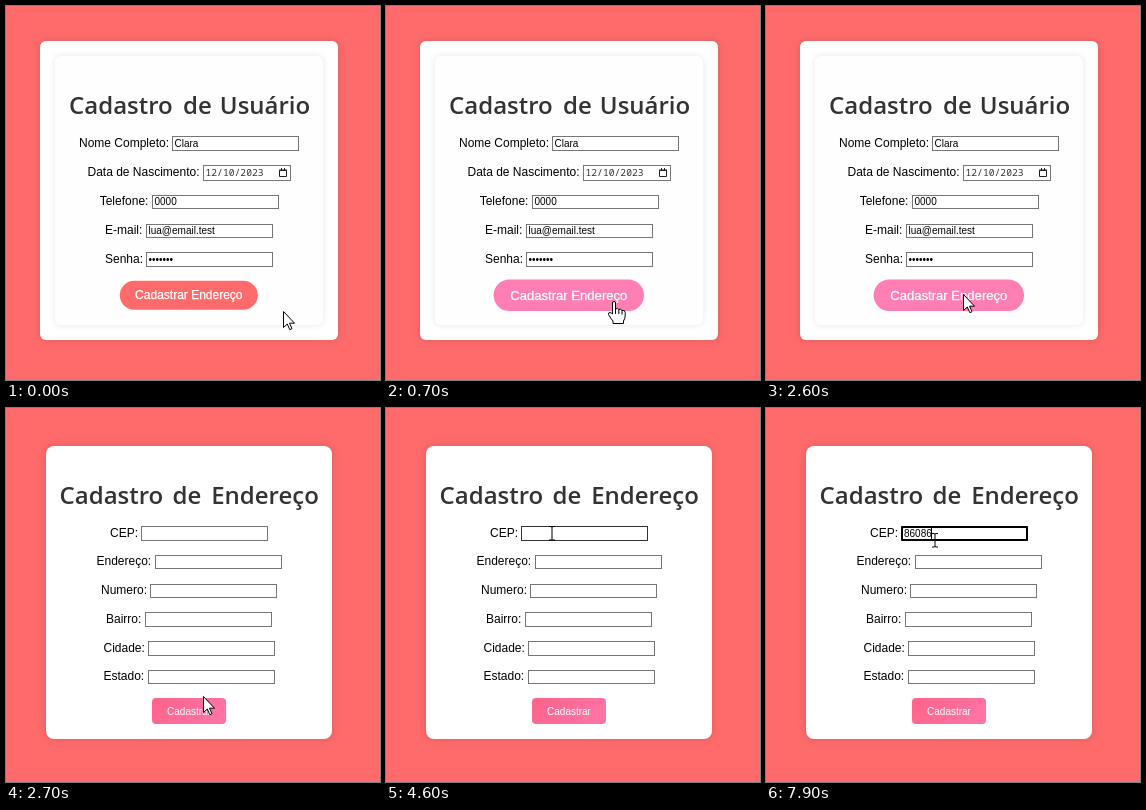
These frames come from a looping animation (374 by 374 pixels, 8000 ms). An HTML page:

```html
<!DOCTYPE html>
<html lang="pt-BR">
<head>
<meta charset="utf-8">
<style>
  html, body { margin: 0; height: 100%; overflow: hidden; background: #ff6b6b; }
  svg { display: block; width: 374px; height: 374px; font: 12px Arial, "Liberation Sans", sans-serif; }
  .card { fill: #fff; filter: drop-shadow(0 0 4px rgba(0, 0, 0, .14)); }
  .form { fill: #fefefe; filter: drop-shadow(0 0 3px rgba(0, 0, 0, .1)); }
  .title { font: 600 24px "Comic Sans MS", "Open Sans", "Noto Sans", cursive; fill: #333; text-anchor: middle; }
  .box { fill: #fff; stroke: #767676; }
  .value { font-size: 10px; }
  .date { font: 9.7px "Noto Sans Mono", monospace; fill: #333; }
  .button { fill: #fff; stroke: #fff; stroke-width: .25px; text-anchor: middle; }
  .button.value { stroke: none; }
  .cursor { fill: #fff; stroke: #000; stroke-linejoin: round; }
</style>
</head>
<body>
<svg viewBox="0 0 374 374">
  <defs>
    <linearGradient id="pink" x2="1" y2=".4">
      <stop stop-color="#ff6389"/><stop offset="1" stop-color="#ff73a4"/>
    </linearGradient>
  </defs>
  <rect width="374" height="374" fill="#ff6b6b"/>

  <g id="userPage">
    <rect class="card" x="34" y="35" width="298" height="299" rx="6"/>
    <rect class="form" x="49" y="50" width="268" height="269" rx="6"/>
    <text class="title" y="108"><tspan x="118">Cadastro</tspan> <tspan x="194.5">de</tspan> <tspan x="259">Usuário</tspan></text>
    <g id="userRows"></g>
    <path d="M273.500 164.500h7v6h-7zM273 164h8M275.500 162v2M278.500 162v2" fill="none" stroke="#222"/>
    <g id="submit">
      <rect id="pill" x="-69" y="-14.500" width="138" height="29" rx="14.500"/>
      <text class="button" y="4">Cadastrar Endereço</text>
    </g>
  </g>

  <g id="addressPage">
    <rect class="card" x="40" y="38" width="286" height="293" rx="8"/>
    <text class="title" y="96"><tspan x="108.5">Cadastro</tspan> <tspan x="184">de</tspan> <tspan x="259">Endereço</tspan></text>
    <g id="addressRows"></g>
    <rect id="ring" x="136" y="119" width="125" height="13" rx="1.500" fill="#fff" stroke="#000" stroke-width="2"/>
    <text id="cep" class="value" x="138" y="129"></text>
    <path id="caret" d="M.5 120v11" stroke="#000"/>
    <rect x="146" y="290" width="74" height="26" rx="4" fill="url(#pink)"/>
    <text class="button value" x="183" y="307">Cadastrar</text>
  </g>

  <g id="cursor">
    <path id="arrow" class="cursor" d="M.5 .5V16.500L4.300 13 6.800 18.700 9 17.700 6.500 12.200H11.500Z"/>
    <path id="hand" class="cursor" d="M-1.500 13V2Q-1.500 .5 0 .5T1.500 2V8Q4 6.500 4.800 8.500 7 7.500 8 9.500 11 8.500 11.200 11.500V15Q11 18 9.500 20V22.500H-1V20Q-3 18-5.500 13.500-6 11.500-4 11.500-2.500 12-1.500 13ZM1.500 8v5M4.800 8.500v4.500M8 9.500v4"/>
    <path id="beam" d="M-3 -6.500H-1Q0 -6.500 0 -5.500 0 -6.500 1 -6.500H3M0 -5.500V6M-3 7H-1Q0 7 0 6 0 7 1 7H3" fill="none" stroke="#000"/>
  </g>
</svg>
<script>
const $ = id => document.getElementById(id);
const show = (id, on) => $(id).style.display = on ? '' : 'none';

// Field edges and baselines snap to whole pixels, as in a zoomed page.
function row({ label, lx, bx, y, value = '', width = 127, height = 14.4, kind = '' }) {
  const top = Math.round(y), bottom = Math.round(y + height), base = Math.round(y + 10.6);
  return `
    <text x="${lx}" y="${base}">${label}</text>
    <rect class="box" x="${bx + .5}" y="${top + .5}" width="${width - 1}" height="${bottom - top - 1}"/>
    <text class="value ${kind}" x="${bx + 2.5}" y="${base}">${value}</text>`;
}

$('userRows').innerHTML = [
  { label: 'Nome Completo:', lx: 73, bx: 166, y: 130.2, value: 'Clara' },
  { label: 'Data de Nascimento:', lx: 81.5, bx: 197, y: 159.2, value: '12/10/2023', width: 88, height: 15.6, kind: 'date' },
  { label: 'Telefone:', lx: 93.7, bx: 146, y: 188.8, value: '0000' },
  { label: 'E-mail:', lx: 99, bx: 140, y: 217.6, value: 'lua@email.test' },
  { label: 'Senha:', lx: 99, bx: 140, y: 246.4, value: '•'.repeat(7) },
].map(row).join('');

$('addressRows').innerHTML = [
  ['CEP:', 104, 135], ['Endereço:', 90.5, 149], ['Numero:', 95, 144],
  ['Bairro:', 100, 139], ['Cidade:', 97.5, 142], ['Estado:', 97.5, 142],
].map(([label, lx, bx], i) => row({ label, lx, bx, y: 118.1 + 28.75 * i })).join('');
const cepBox = $('addressRows').querySelector('rect');

// [time, x, y] of the pointer's hot spot
const path = [
  [0, 277, 305], [300, 250, 300], [700, 228, 295], [900, 216, 294], [1200, 197, 288],
  [3300, 197, 288], [3600, 166, 103], [3900, 161, 115], [4100, 166, 125],
  [4600, 166, 125], [4900, 169, 132], [8000, 169, 132],
];
const keyTimes = [6600, 6800, 7300, 7600, 7900];
const LOOP = 8000, HOVER = 300, CLICK = 2600, PAGE = 2700, FOCUS = 4700;

function pointerAt(t) {
  const i = path.findIndex(p => p[0] > t);
  const [a, b] = [path[i - 1], path[i]];
  const k = (t - a[0]) / (b[0] - a[0]);
  return [1, 2].map(n => Math.round(a[n] + (b[n] - a[n]) * k));
}

function draw(t) {
  const [x, y] = pointerAt(t);
  const address = t >= PAGE;
  show('userPage', !address);
  show('addressPage', address);

  const h = Math.min(1, Math.max(0, (t - HOVER) / 300));
  const hover = 1 - (1 - h) ** 2;
  $('submit').setAttribute('transform', `translate(182.8 289.3) scale(${1 + .09 * hover})`);
  $('pill').setAttribute('fill', `rgb(255,${107 + 19 * hover},${107 + 72 * hover})`);

  const typed = keyTimes.filter(k => t >= k).length;
  $('cep').textContent = '86086'.slice(0, typed);
  $('caret').setAttribute('transform', `translate(${Math.round(138 + typed * 5.56 - .5)} 0)`);
  const blinkedOff = (t >= 5500 && t < 6000) || (t >= 6500 && t < 6600);
  show('caret', t >= FOCUS && !blinkedOff);
  show('ring', t >= FOCUS);
  cepBox.style.stroke = t >= 4600 ? '#333' : '';

  const beam = address && t > 3700 && y >= 118;
  const hand = t >= HOVER && t < CLICK;
  show('beam', beam);
  show('hand', hand);
  show('arrow', !beam && !hand);
  $('cursor').setAttribute('transform', `translate(${x} ${y})`);
}

const start = performance.now();
function tick() {
  draw(Math.floor((performance.now() - start) % LOOP / 100) * 100);
  requestAnimationFrame(tick);
}
tick();
</script>
</body>
</html>
```
